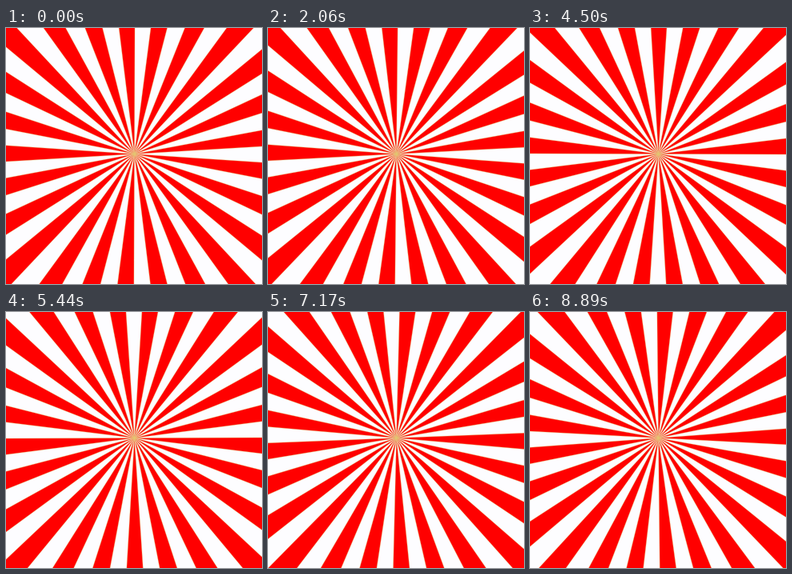
An HTML page for the animation above (8950 ms loop, 320 px wide and 320 px high).

```html
<!DOCTYPE html>
<html lang="en">
<head>
<meta charset="utf-8">
<title>Sunburst</title>
<style>
  html, body { margin: 0; width: 100%; height: 100%; overflow: hidden; background: #fdfdff; }
  svg { display: block; width: 100%; height: 100%; }
</style>
</head>
<body>
<svg viewBox="0 0 320 320">
  <rect width="320" height="320" fill="#fdfdff"/>
  <path id="rays" fill="#f00" stroke="#e2c870" stroke-width="0.8" stroke-opacity="0.45"/>
</svg>
<script>
  const LOOP = 8950;
  const STEP = 500 / 9;
  const RAYS = 25;
  const PITCH = 360 / RAYS;
  const CENTER = { x: 160.5, y: 157.5 };
  const RADIUS = 300;
  const START_ANGLE = 11;
  const STEP_ANGLE = 0.4;

  const rays = document.getElementById('rays');

  // Angles run clockwise from straight up.
  function point(degrees) {
    const a = degrees * Math.PI / 180;
    return `${(RADIUS * Math.sin(a)).toFixed(3)} ${(-RADIUS * Math.cos(a)).toFixed(3)}`;
  }

  function ray(_, i) {
    const middle = i * PITCH;
    return `M0 0L${point(middle - PITCH / 4)}L${point(middle + PITCH / 4)}Z`;
  }

  rays.setAttribute('d', Array.from({ length: RAYS }, ray).join(''));

  function render(time) {
    let step = Math.floor((time % LOOP + 5) / STEP);
    // The wheel pauses briefly near the start of each loop.
    if (step === 2 || step === 3) step = 1;
    step = Math.min(step, 160);
    const angle = START_ANGLE + step * STEP_ANGLE;
    rays.setAttribute('transform', `translate(${CENTER.x} ${CENTER.y}) rotate(${angle.toFixed(3)})`);
  }

  const start = performance.now();
  function tick() {
    render(performance.now() - start);
    requestAnimationFrame(tick);
  }
  tick();
</script>
</body>
</html>
```
